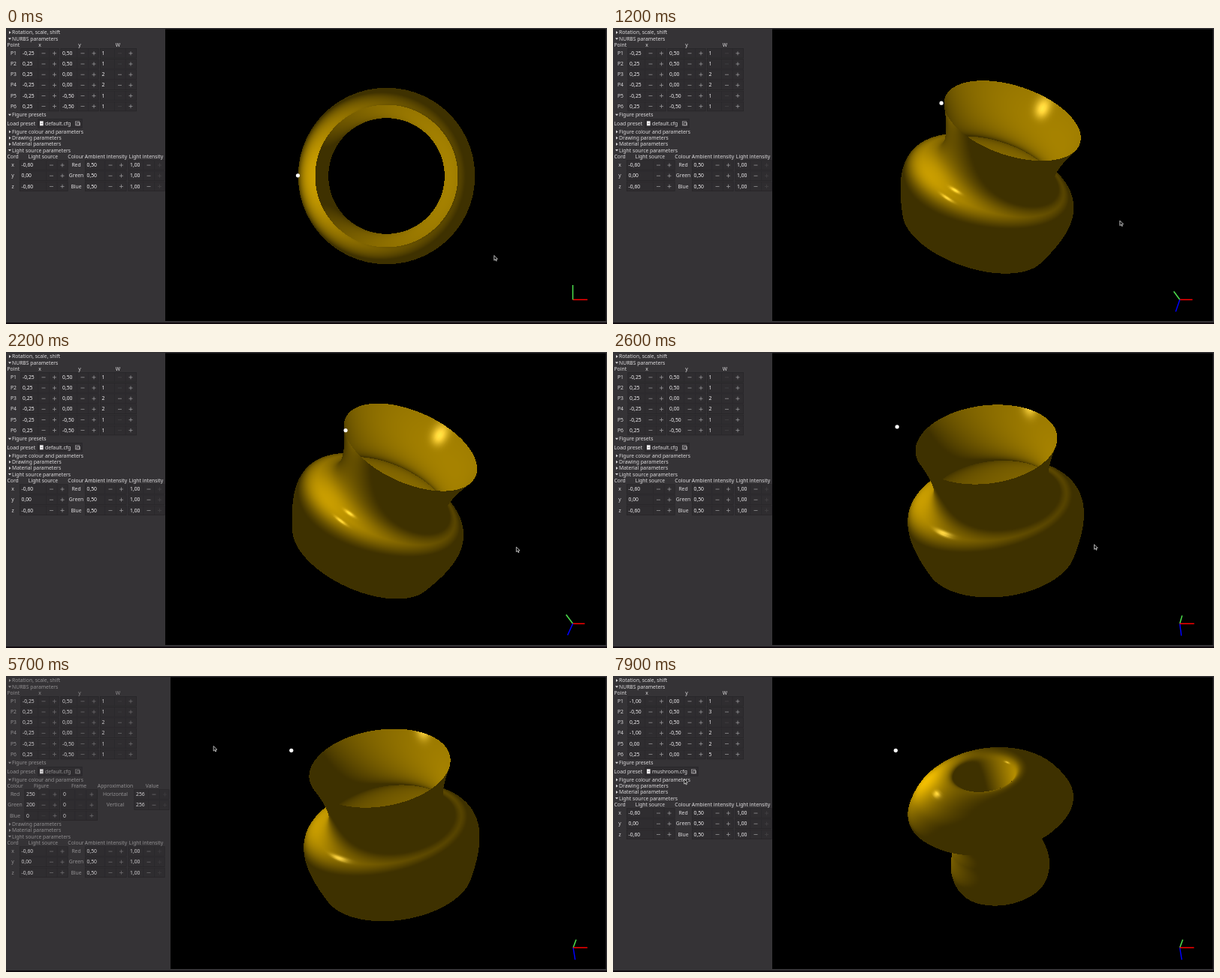
An HTML page with a canvas for the animation above (8000 ms loop, 800 px wide and 395 px high).

```html
<!DOCTYPE html>
<html lang="en">
<head>
<meta charset="utf-8">
<title>NURBS surface viewer</title>
<style>
html, body { margin: 0; width: 100%; height: 100%; overflow: hidden; background: #000; }
canvas { display: block; width: 800px; height: 395px; }
</style>
</head>
<body>
<canvas id="stage" width="800" height="395"></canvas>
<script>
const ctx = document.getElementById('stage').getContext('2d');
const LOOP = 8000, STEP = 100, UNIT = 195, CY = 196.5, RAD = Math.PI / 180;
const LIGHT = [-0.6, 0, -0.6];

// Profiles map 0..1 to [radius, height]; height runs against the z axis.
function vase(u) {
  const k = 1 - 2 * u, s = Math.abs(k), q = 1 - s, sign = Math.sign(k);
  const bezier = (a, b, c) => 3 * q * q * s * a + 3 * q * s * s * b + s * s * s * c;
  return [.5 - sign * bezier(.165, .105, .013), sign * bezier(.04, .25, .458)];
}

const CAP_AND_STEM = [[.15, 0], [.165, .2], [.19, .35], [.225, .412], [.3, .412], [.4, .365],
  [.5, .285], [.569, .16], [.545, .11], [.5, .075], [.39, .03], [.295, -.04], [.31, -.18],
  [.338, -.34], [.3, -.468], [.2, -.52]];
function mushroom(u) {
  const last = CAP_AND_STEM.length - 1, i = Math.min(Math.floor(u * last), last - 1), f = u * last - i;
  const at = k => CAP_AND_STEM[Math.max(0, Math.min(last, k))];
  const a = at(i - 1), b = at(i), c = at(i + 1), d = at(i + 2);
  return [0, 1].map(k => .5 * (2 * b[k] + (c[k] - a[k]) * f + (2 * a[k] - 5 * b[k] + 4 * c[k] - d[k]) * f * f
    + (3 * b[k] - a[k] - 3 * c[k] + d[k]) * f * f * f));
}

const PRESETS = {
  'default.cfg': { profile: vase, iconX: 92, rows: [
    ['-0,25', '0,50', '1'], ['0,25', '0,50', '1'], ['0,25', '0,00', '2'],
    ['-0,25', '0,00', '2'], ['-0,25', '-0,50', '1'], ['0,25', '-0,50', '1']] },
  'mushroom.cfg': { profile: mushroom, iconX: 104, rows: [
    ['-1,00', '0,00', '1'], ['-0,50', '0,50', '3'], ['0,25', '0,50', '1'],
    ['-1,00', '-0,50', '2'], ['0,00', '-0,50', '2'], ['0,25', '0,00', '5']] }
};

// [time, pitch, yaw] in degrees
const TURN = [[100, 0, 0], [1000, 56, -18], [1200, 55.7, -30], [1600, 48.7, -77.5], [1700, 48, -82],
  [1800, 48, -82], [2600, 56, 11], [2700, 56, 12], [2800, 56.4, 14]];
// [time, x, y]
const POINTER = [[2800, 638, 259], [3600, 66, 121], [3800, 69, 134], [4000, 69, 134],
  [4500, 76, 126], [4700, 76, 126], [5100, 562, 150], [5500, 276, 94], [5700, 275.5, 93],
  [6200, 275.5, 93], [6700, 537, 134], [7000, 537, 134], [7500, 94, 137]];

function track(keys, t) {
  if (t <= keys[0][0]) return keys[0].slice(1);
  for (let i = 1; i < keys.length; i++) {
    const a = keys[i - 1], b = keys[i];
    if (t <= b[0]) {
      const k = (t - a[0]) / (b[0] - a[0]);
      return [a[1] + (b[1] - a[1]) * k, a[2] + (b[2] - a[2]) * k];
    }
  }
  return keys[keys.length - 1].slice(1);
}

const dot = (a, b) => a[0] * b[0] + a[1] * b[1] + a[2] * b[2];
function unit(v) {
  const l = Math.hypot(v[0], v[1], v[2]) || 1;
  return [v[0] / l, v[1] / l, v[2] / l];
}

const AROUND = 160, ALONG = 100;
function buildMesh(profile) {
  const mesh = [];
  for (let j = 0; j <= ALONG; j++) {
    const u = j / ALONG, [r, h] = profile(u);
    const lo = profile(Math.max(0, u - .004)), hi = profile(Math.min(1, u + .004));
    const dr = hi[0] - lo[0], dh = hi[1] - lo[1];
    for (let i = 0; i < AROUND; i++) {
      const c = Math.cos(i / AROUND * 2 * Math.PI), s = Math.sin(i / AROUND * 2 * Math.PI);
      mesh.push({ p: [r * c, r * s, -h], n: unit([dh * c, dh * s, dr]) });
    }
  }
  return mesh;
}
for (const preset of Object.values(PRESETS)) preset.mesh = buildMesh(preset.profile);

function camera(pitch, yaw) {
  const ca = Math.cos(pitch * RAD), sa = Math.sin(pitch * RAD);
  const cb = Math.cos(yaw * RAD), sb = Math.sin(yaw * RAD);
  return { right: [cb, sb * sa, sb * ca], up: [0, ca, -sa], eye: [sb, -cb * sa, -cb * ca] };
}

const VW = 300, VH = 290;
const view = ctx.createImageData(VW, VH), depth = new Float32Array(VW * VH);

// Returns [diffuse, specular] for one side of a surface point.
function shade(n, toLight, dist, half, side) {
  const nl = side * dot(n, toLight);
  if (nl <= 0) return [.25, 0];
  return [.25 + .56 * nl / (.55 + .75 * dist), Math.pow(Math.max(0, side * dot(n, half)), 300)];
}

function fillTriangle(a, b, c) {
  const area = (b.x - a.x) * (c.y - a.y) - (b.y - a.y) * (c.x - a.x);
  if (Math.abs(area) < 1e-7) return;
  const side = a.facing + b.facing + c.facing > 0 ? 'front' : 'back';
  const A = a[side], B = b[side], C = c[side], px = view.data;
  const x0 = Math.max(0, Math.ceil(Math.min(a.x, b.x, c.x))), x1 = Math.min(VW - 1, Math.max(a.x, b.x, c.x));
  const y0 = Math.max(0, Math.ceil(Math.min(a.y, b.y, c.y))), y1 = Math.min(VH - 1, Math.max(a.y, b.y, c.y));
  for (let y = y0; y <= y1; y++) for (let x = x0; x <= x1; x++) {
    const v = ((x - a.x) * (c.y - a.y) - (y - a.y) * (c.x - a.x)) / area;
    const w = ((b.x - a.x) * (y - a.y) - (b.y - a.y) * (x - a.x)) / area;
    const u = 1 - v - w;
    if (u < -1e-6 || v < -1e-6 || w < -1e-6) continue;
    const z = u * a.z + v * b.z + w * c.z, k = y * VW + x;
    if (z <= depth[k]) continue;
    depth[k] = z;
    const d = u * A[0] + v * B[0] + w * C[0], s = u * A[1] + v * B[1] + w * C[1];
    px[k * 4] = 250 * d + 115 * s;
    px[k * 4 + 1] = 196 * d + 105 * s;
    px[k * 4 + 2] = 70 * s;
  }
}

function renderSurface(mesh, cam) {
  depth.fill(-9);
  for (let i = 0; i < view.data.length; i += 4) {
    view.data[i] = view.data[i + 1] = view.data[i + 2] = 0;
    view.data[i + 3] = 255;
  }
  const verts = mesh.map(({ p, n }) => {
    const ray = [LIGHT[0] - p[0], LIGHT[1] - p[1], LIGHT[2] - p[2]];
    const toLight = unit(ray), dist = Math.hypot(ray[0], ray[1], ray[2]);
    const half = unit([toLight[0] + cam.eye[0], toLight[1] + cam.eye[1], toLight[2] + cam.eye[2]]);
    return {
      x: VW / 2 + UNIT * dot(p, cam.right), y: VH / 2 - UNIT * dot(p, cam.up), z: dot(p, cam.eye),
      facing: dot(n, cam.eye),
      front: shade(n, toLight, dist, half, 1), back: shade(n, toLight, dist, half, -1)
    };
  });
  for (let j = 0; j < ALONG; j++) for (let i = 0; i < AROUND; i++) {
    const k = (i + 1) % AROUND, row = j * AROUND, next = row + AROUND;
    fillTriangle(verts[row + i], verts[row + k], verts[next + i]);
    fillTriangle(verts[next + i], verts[row + k], verts[next + k]);
  }
}

let ink, valueInk, buttonInk, faintInk;

function rect(x, y, w, h, color) {
  ctx.fillStyle = color;
  ctx.fillRect(x, y, w, h);
}
function label(str, x, y, align = 'left', color = ink) {
  ctx.fillStyle = color;
  ctx.textAlign = align;
  ctx.fillText(str, x, y + .3);
}
function section(str, y, open) {
  ctx.fillStyle = ink;
  ctx.beginPath();
  if (open) { ctx.moveTo(3, y - 1.3); ctx.lineTo(7, y - 1.3); ctx.lineTo(5, y + 1.3); }
  else { ctx.moveTo(4, y - 2); ctx.lineTo(6.6, y); ctx.lineTo(4, y + 2); }
  ctx.fill();
  label(str, 8, y);
}
function box(x, y, w, h) {
  rect(x, y, w, h, '#252326');
  rect(x + .6, y + .6, w - 1.2, h - 1.2, '#2f2d30');
}
function spin(x, w, y, value, minus, plus, noMinus, noPlus) {
  box(x, y - 6.6, w, 13.2);
  rect((minus + plus) / 2, y - 6, .6, 12, '#29272a');
  rect(minus - 7.5, y - 6, .6, 12, '#29272a');
  label(value, x + 2.5, y, 'left', valueInk);
  rect(minus - 2.5, y - .3, 5, .7, noMinus ? faintInk : buttonInk);
  const color = noPlus ? faintInk : buttonInk;
  rect(plus - 2.5, y - .3, 5, .7, color);
  rect(plus - .35, y - 2.5, .7, 5, color);
}

function drawPanel(rows, file, iconX, expanded) {
  ctx.font = '6.8px "Noto Sans", "Open Sans", sans-serif';
  ctx.textBaseline = 'middle';
  section('Rotation, scale, shift', 6, false);
  section('NURBS parameters', 14.5, true);
  label('Point', 1.5, 22.5);
  [['x', 45], ['y', 98], ['W', 149]].forEach(([s, x]) => label(s, x, 22.5, 'center'));
  rows.forEach(([x, y, w], i) => {
    const cy = 33.8 + i * 14.15;
    label('P' + (i + 1), 10, cy, 'center');
    spin(19.5, 51, cy, x, 50, 64.5, x === '-1,00');
    spin(72.5, 51, cy, y, 102, 117);
    spin(125, 49, cy, w, 151.5, 166, w === '1');
  });
  section('Figure presets', 116, true);
  label('Load preset', 1.5, 127.3);
  box(42.5, 121, iconX - 33, 12.5);
  rect(45, 124.3, 4.6, 6, valueInk);
  rect(46, 127, 2.6, .6, '#777');
  label(file, 52, 127.3);
  ctx.strokeStyle = buttonInk;
  ctx.lineWidth = .8;
  ctx.strokeRect(iconX + .5, 124.8, 5, 5);
  ctx.strokeRect(iconX + 2.2, 126.6, 4.4, 3.2);

  section('Figure colour and parameters', 138.6, expanded);
  const shift = expanded ? 51 : 0;
  if (expanded) {
    label('Colour', 1.5, 147);
    [['Figure', 47], ['Frame', 97], ['Approximation', 145.5], ['Value', 194.5]]
      .forEach(([s, x]) => label(s, x, 147, 'center'));
    [['Red', '250'], ['Green', '200'], ['Blue', '0']].forEach(([name, value], i) => {
      const cy = 158 + i * 14.15;
      label(name, 12, cy, 'center');
      spin(24.5, 47.5, cy, value, 50, 65, value === '0');
      spin(73.5, 48.5, cy, '0', 99, 114, true);
      if (i < 2) {
        label(i ? 'Vertical' : 'Horizontal', 145.5, cy, 'center');
        spin(170.5, 47, cy, '256', 197, 211.5, false, true);
      }
    });
  }
  section('Drawing parameters', 146.8 + shift, false);
  section('Material parameters', 155 + shift, false);
  section('Light source parameters', 163.3 + shift, true);
  const head = 172 + shift;
  label('Cord', 1.5, head);
  [['Light source', 49.5], ['Colour', 93], ['Ambient intensity', 133], ['Light intensity', 186.5]]
    .forEach(([s, x]) => label(s, x, head, 'center'));
  [['x', '-0,60', 'Red'], ['y', '0,00', 'Green'], ['z', '-0,60', 'Blue']].forEach(([axis, value, name], i) => {
    const cy = 183 + shift + i * 14.15;
    label(axis, 9, cy, 'center');
    spin(18, 64.5, cy, value, 60.5, 75);
    label(name, 93.5, cy, 'center');
    spin(105, 55.5, cy, '0,50', 139, 153.5);
    spin(162.5, 49, cy, '1,00', 190, 204.5, false, true);
  });
}

function drawGnomon(cam, x, y) {
  ctx.lineWidth = 1.5;
  ['#f00', '#4de04d', '#00f'].map((color, i) => ({ color, i }))
    .sort((a, b) => cam.eye[a.i] - cam.eye[b.i])
    .forEach(({ color, i }) => {
      ctx.strokeStyle = color;
      ctx.beginPath();
      ctx.moveTo(x, y);
      ctx.lineTo(x + 19.5 * cam.right[i], y - 19.5 * cam.up[i]);
      ctx.stroke();
    });
}

function drawPointer(x, y) {
  ctx.beginPath();
  [[0, 0], [0, 6.6], [1.6, 5.2], [2.6, 7.5], [3.6, 7.1], [2.6, 4.9], [4.7, 4.7]]
    .forEach(([dx, dy]) => ctx.lineTo(x + .7 + dx, y + .5 + dy));
  ctx.closePath();
  ctx.fillStyle = '#111';
  ctx.fill();
  ctx.strokeStyle = '#d8d8d8';
  ctx.lineWidth = .8;
  ctx.stroke();
}

function draw(t) {
  const expanded = t >= 4000 && t < 7900, inactive = t >= 4700 && t < 7100;
  const loaded = t >= 7100 ? 'mushroom.cfg' : 'default.cfg';
  const rows = PRESETS[t >= 6800 ? 'mushroom.cfg' : 'default.cfg'].rows;
  const left = expanded ? 219 : 212, cx = expanded ? 509 : 505.5;
  const [pitch, yaw] = track(TURN, t), cam = camera(pitch, yaw);
  ink = inactive ? '#918f91' : '#dedcde';
  valueInk = inactive ? '#d0ced0' : '#f2f0f2';
  buttonInk = inactive ? '#757376' : '#a3a1a4';
  faintInk = inactive ? '#403e41' : '#464447';

  rect(0, 0, 800, 395, '#353336');
  rect(0, 393, 800, 2, '#120c11');
  drawPanel(rows, loaded, PRESETS[loaded].iconX, expanded);
  rect(left, 0, 800 - left, 393, '#353336');
  rect(left, 1.5, 798.5 - left, 389.5, '#000');

  renderSurface(PRESETS[loaded].mesh, cam);
  ctx.putImageData(view, Math.round(cx - VW / 2), Math.round(CY - VH / 2));
  drawGnomon(cam, expanded ? 755 : 754.5, 362.5);

  ctx.fillStyle = '#fff';
  ctx.beginPath();
  ctx.arc(cx + UNIT * dot(LIGHT, cam.right), CY + .3 - UNIT * dot(LIGHT, cam.up), 2.6, 0, 7);
  ctx.fill();

  const pointer = t < 2800 ? [649 - yaw / 1.2, 303 - pitch / 1.2] : track(POINTER, t);
  drawPointer(pointer[0], pointer[1]);
}

let shown = -1;
const start = performance.now();
function tick() {
  const t = Math.floor(((performance.now() - start) % LOOP) / STEP) * STEP;
  if (t !== shown) {
    shown = t;
    draw(t);
  }
  requestAnimationFrame(tick);
}
tick();
</script>
</body>
</html>
```
